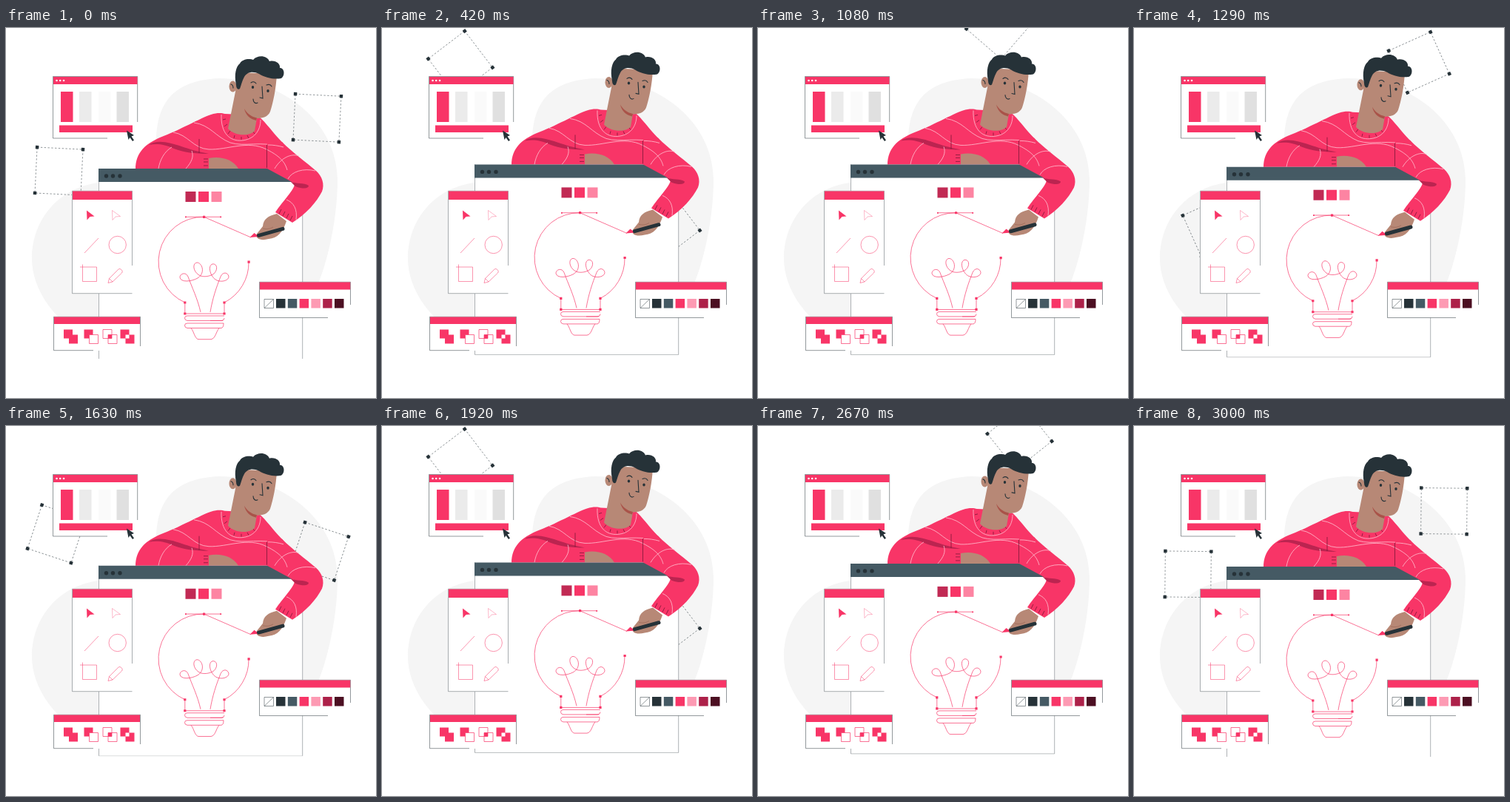
An HTML page that plays this animation: 500 px wide and 500 px high, repeating every 3040 ms.

```html
<!DOCTYPE html>
<html lang="en">
<head>
<meta charset="utf-8">
<title>Designer at work</title>
<style>
html, body { margin: 0; width: 100%; height: 100%; overflow: hidden; background: #fff; }
svg { display: block; width: 100vw; height: 100vh; }
.p { fill: #f83567; }
.d { fill: #263238; }
.w { fill: #fff; }
.skin { fill: #b78876; }
.shade { fill: #bb2450; }
.edge { fill: none; stroke: #263238; stroke-width: .5; }
.thin { fill: none; stroke: #f83567; stroke-width: .7; }
.knit { fill: none; stroke: #ffc3d2; stroke-width: .8; }
.rib { fill: none; stroke: #7c1838; stroke-width: .8; }
.face { fill: none; stroke: #263238; stroke-width: 1.1; stroke-linecap: round; }
</style>
</head>
<body>
<svg viewBox="0 0 500 500">
  <defs>
    <g id="frame">
      <rect x="-31" y="-31" width="62" height="62" fill="none" stroke="#263238" stroke-width=".5" stroke-dasharray="2.4 2.4"/>
      <path class="d" d="M-33.2-33.2h4.4v4.4h-4.4zM28.8-33.2h4.4v4.4h-4.4zM-33.2 28.8h4.4v4.4h-4.4zM28.8 28.8h4.4v4.4h-4.4z"/>
    </g>
  </defs>

  <path fill="#f5f5f5" d="M203 150C205 105 222 71 288 68C372 68 447 125 448 205C448 262 432 340 402 385L125 425C65 402 35 352 35 312C35 260 70 216 125 209L180 200Z"/>

  <g id="orbit">
    <use href="#frame" x="172.5" y="-44.5"/>
    <use href="#frame" x="-172.5" y="44.5"/>
  </g>

  <g id="desk">
    <!-- torso -->
    <path class="p" d="M175 191C175 167 190 156 208 148C235 138 262 122 277 117C286 114 292 115 296 116L338 118C347 121 358 139 374 155L400 195Z"/>
    <path class="shade" d="M193 158C204 150 222 155 237 160C249 164 259 167 274 170C255 170 240 168 227 163C214 157 204 156 193 158Z"/>
    <g class="knit">
      <path d="M254 128C276 131 283 147 303 155C323 161 343 152 374 161"/>
      <path d="M226 141C246 144 253 163 274 164C299 165 327 151 352 164C370 173 377 181 380 192"/>
      <path d="M206 190C208 178 214 167 224 161"/>
      <path d="M243 190C251 181 254 174 251 166"/>
      <path d="M291 117C290 143 303 153 318 152C335 151 344 139 344 124"/>
    </g>
    <path class="rib" d="M293 124l4-1M295 133l4-3M300 143l3-4M308 149l1-4M318 151v-4M328 149l-2-4M336 143l-3-4M261 150V169M267 177h6M267 181h6M267 186h6"/>
    <!-- head -->
    <ellipse class="skin" cx="306.500" cy="79" rx="5" ry="7.500"/>
    <path class="skin" d="M312 60L366 62C365 82 361 101 357 113C354 120 347 122 339 122L336 139C329 147 309 146 300 136L310 86Z"/>
    <path fill="#a95349" d="M322 109C326 116 332 120 339 121.500L338 125C330 123 324 118 322 109Z"/>
    <path class="d" d="M311 77C308 62 311 52 316 48C319 42 329 41 334 43C340 36 353 37 356 45C364 43 371 48 370 54C377 54 377 65 372 68C362 70 350 67 342 62C334 58 326 59 322 66C319 71 318 77 316 82C314 84 311 82 311 77Z"/>
    <path class="face" d="M331 74Q335 71 338 75M352 77Q357 75 359 79M346 79L347 95L343 94M334 96C334 100 337 103 340 101M304 76Q307 77 307 81"/>
    <ellipse class="d" cx="333.500" cy="80" rx="1.700" ry="2"/>
    <ellipse class="d" cx="354" cy="85" rx="1.700" ry="2"/>
    <path class="skin" d="M274 176C290 173 306 177 314 190H274Z"/>

    <!-- canvas window -->
    <path class="w" d="M125 190H401V447H125Z"/>
    <path class="edge" d="M125.500 447V190M400.700 190V447" stroke-opacity=".75"/>
    <path id="base" class="edge" d="M125.500 447H400.700"/>
    <path fill="#455a64" d="M125 190H401V208H125Z"/>
    <g class="d"><circle cx="135.500" cy="200" r="2.700"/><circle cx="144.500" cy="200" r="2.700"/><circle cx="154" cy="200" r="2.700"/></g>
    <path fill="#c12a54" d="M242.500 221h14v14h-14z"/>
    <path class="p" d="M260 221h14v14h-14z"/>
    <path fill="#fd84a2" d="M277.500 221h14v14h-14z"/>

    <!-- bulb -->
    <g class="thin">
      <path d="M331 283L267.500 255.300A60.500 60.500 0 0 0 241.800 371V386H295V371A60.500 60.500 0 0 0 328 316M243 255.300H290"/>
      <path d="M295 389H245Q241.500 389 241.500 392T245 395.500H291Q295 395.500 295 392M276 395.500H293M294 399H245Q241.500 399 241.500 402T245 405.500H291Q294 405 294 399"/>
      <path d="M250 405.500C254 410 255 420 260 420.700H277C283 420 284 410 288 405.500"/>
      <path d="M263 384C259 366 251 350 246 336C243 329 235 332 235 337C236 344 250 343 259 338C270 331 265 317 258 317C251 318 253 331 263 335C269 337 277 335 281 332C287 326 285 318 279 319C272 321 276 337 285 341C292 344 301 341 301 336C300 330 293 329 290 336C284 351 279 366 276 384"/>
    </g>
    <path class="p" d="M266 253.700h3.200v3.200h-3.200zM326.500 314.500h3.200v3.200h-3.200zM240.200 369.400h3.200v3.200h-3.200zM293.400 369.400h3.200v3.200h-3.200zM240.200 384.400h3.200v3.200h-3.200zM293.400 384.400h3.200v3.200h-3.200zM242 254.500h1.800v1.800h-1.800zM289.300 254.500h1.800v1.800h-1.800z"/>

    <!-- drawing arm -->
    <path class="skin" d="M366 251C354 254 348 258 347 268L339 278C336 285 345 288 355 285C367 284 374 276 379 261Z"/>
    <path class="p" d="M353 155V190L390 210C391 217 374 234 364 249L387 263C405 252 420 235 427 221C431 211 427 200 419 193C404 180 388 169 373 154Z"/>
    <path class="shade" d="M384 207C393 212 402 208 409 213C409 217 402 218 391 214Z"/>
    <g class="knit">
      <path d="M352 164C370 173 377 181 380 192"/>
      <path d="M354 158C361 158 368 159 375 161"/>
      <path d="M363 190C372 175 386 169 396 173"/>
      <path d="M381 204C386 194 402 189 418 193"/>
      <path d="M379 232C389 236 394 245 392 259"/>
    </g>
    <path class="rib" d="M352.500 158V189M369 251l3-6M374 254l3-6M379 257l3-6M384 260l3-6"/>
    <path class="p" d="M329.500 283L335.500 277L342 282Z"/>
    <path d="M341.500 280.300L374 271.300" stroke="#263238" stroke-width="5" stroke-linecap="round"/>
    <path d="M347 271C352 272 356 272 361 269" fill="none" stroke="#95614f" stroke-width=".6"/>
  </g>

  <!-- colour bars -->
  <path class="w" d="M63 65H178V149H63Z"/>
  <path class="edge" d="M137 149H63.500V65.500H177.700V127"/>
  <path class="p" d="M64 66H177.500V76H64ZM74 86h16.500v41H74zM72 131.500h99v9.500H72z"/>
  <g class="w"><circle cx="68.500" cy="71" r="1.300"/><circle cx="73.200" cy="71" r="1.300"/><circle cx="78" cy="71" r="1.300"/></g>
  <path fill="#ebebeb" d="M99 86h16.500v41H99z"/>
  <path fill="#fafafa" d="M125 86h16.500v41H125z"/>
  <path fill="#e0e0e0" d="M149.500 86H166v41h-16.500z"/>
  <path class="d" d="M163 138.500L173 145L169.500 146.500L173 151.500L171 153L167.500 148L165.500 151Z"/>

  <!-- tools -->
  <path class="w" d="M89 220H171V359H89Z"/>
  <path class="edge" d="M170.500 321V220.300H89.500V358.700H170.500" stroke-opacity=".8"/>
  <path class="p" d="M90 220.500H170.300V232H90ZM109 246.500L119.500 254.500L113.500 255L109.500 259.500Z"/>
  <g class="thin" stroke-opacity=".75">
    <path stroke-opacity=".5" d="M143.500 246.500L154.500 254.500L148 255L144 259.500Z"/>
    <path d="M106 304L125 284M100 323H122.500V342.500H103.500V319.500"/>
    <circle cx="150.700" cy="293" r="11.700"/>
    <path d="M138 344.500L139.500 338.500L152 326C154 324 159 328 156.500 331L144 343ZM139.500 338.500L144 343"/>
  </g>

  <!-- shape operations -->
  <path class="w" d="M64 390H182V436H64Z"/>
  <path class="edge" d="M118 435.700H64.500V390.300H181.500V430"/>
  <path class="p" d="M65 390.500H181V400H65Z"/>
  <path class="p" d="M78 407.500h12v7h7v12h-12v-7h-7zM105.500 407.500h12v12h-12zM138 414.500h5v5h-5zM154.500 407.500h12v7h7v12h-12v-7h-7z"/>
  <path class="w" d="M112.500 414.500h12v12h-12zM161.500 414.500h5v5h-5z"/>
  <path class="thin" d="M112.500 414.500h12v12h-12zM131 407.500h12v12h-12zM138 414.500h12v12h-12z"/>

  <!-- palette -->
  <path class="w" d="M342 343H466V391.500H342Z"/>
  <path class="edge" d="M435 391.500H342.500V343.300H465.500V374"/>
  <path class="p" d="M343 343.500H465.200V353.500H343Z"/>
  <path class="edge" d="M349 366.500h12.500v12h-12.500zM349 378.500l12.500-12"/>
  <g id="swatches"></g>
</svg>
<script>
const $ = id => document.getElementById(id);
const LOOP = 3040, CYCLE = 1500, LIFT = 9.7;

$('swatches').innerHTML = ['#263238', '#455a64', '#f83567', '#fd9ab3', '#ad2149', '#4c0f22']
  .map((c, i) => `<rect x="${365 + i * 15.8}" y="366" width="12.500" height="12.500" fill="${c}"/>`).join('');

// softened ease, halfway between linear and smoothstep
const ease = s => (s + s * s * (3 - 2 * s)) / 2;

function draw(now) {
  const t = now % LOOP;
  const u = t < CYCLE ? t : Math.min(t - CYCLE, CYCLE);
  const p = u / CYCLE;
  // half a turn per cycle; the two frames then swap places
  $('orbit').setAttribute('transform', `translate(246 157.600) rotate(${2.7 + .1186 * u})`);
  $('desk').setAttribute('transform', `translate(0 ${-LIFT * ease(1 - Math.abs(1 - 2 * p))})`);
  $('base').setAttribute('stroke-opacity', .65 * Math.abs(Math.sin(p * 2 * Math.PI)));
}

const start = performance.now();
function tick() {
  draw(performance.now() - start);
  requestAnimationFrame(tick);
}
tick();
</script>
</body>
</html>
```
